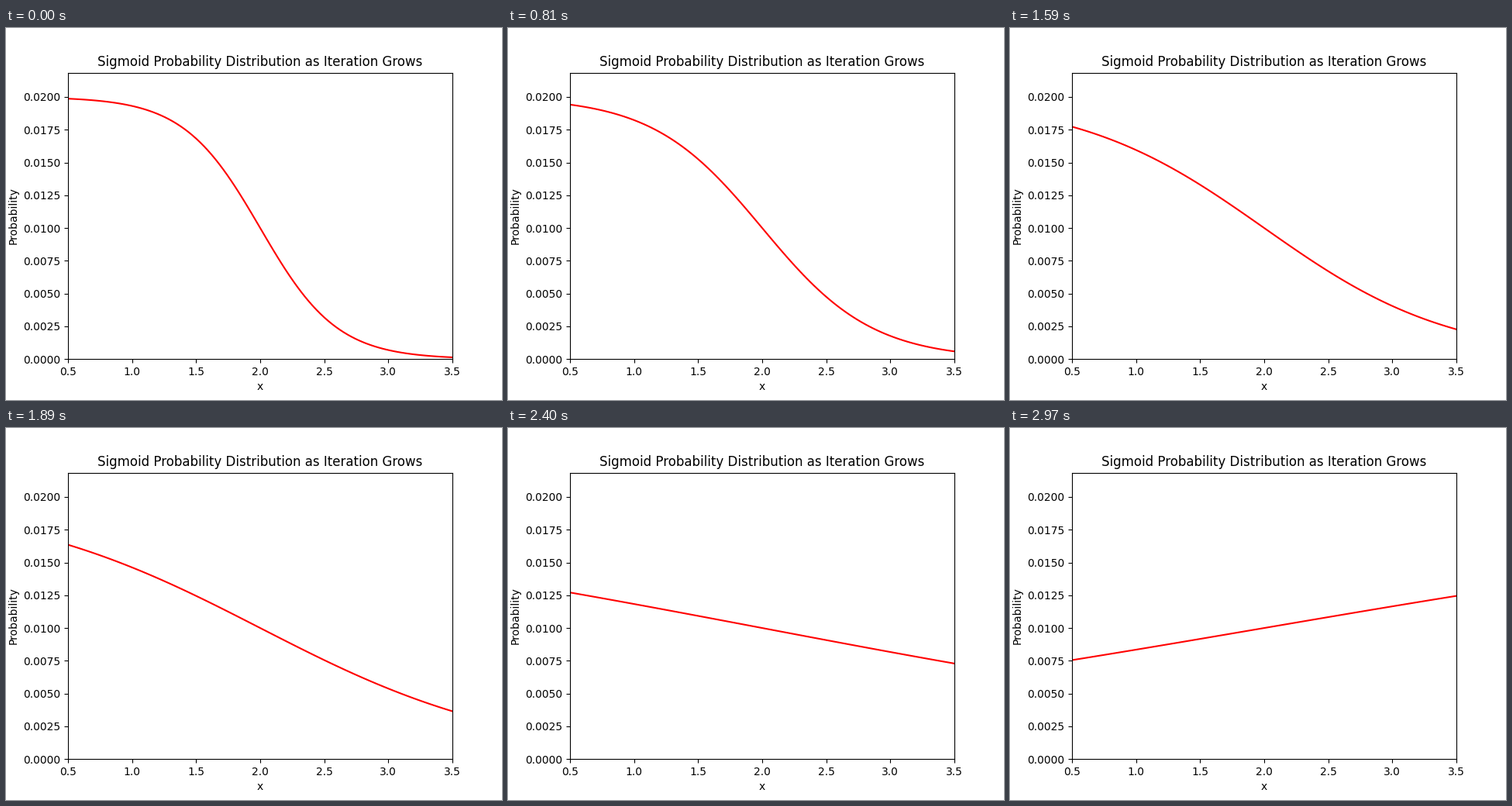
Recreate the animation shown at these times as a matplotlib script. Size 640 by 480 pixels, loop 3 s.

```python
import numpy as np
import matplotlib.pyplot as plt
from matplotlib.animation import FuncAnimation

FRAMES = 100
INTERVAL = 30
POINTS = 100
FLAT_AT = 90  # step at which the curve becomes level

x = np.linspace(0.5, 3.5, POINTS)
u = np.linspace(-5, 5, POINTS)


def probability(step):
    """Falling sigmoid, normalised to sum to one, flattening with each step."""
    steepness = 1 - step / FLAT_AT
    s = 1 / (1 + np.exp(steepness * u))
    return s / s.sum()


fig, ax = plt.subplots(figsize=(6.4, 4.8), dpi=100)
line, = ax.plot(x, probability(0), color="red")
ax.set_xlim(x[0], x[-1])
ax.set_ylim(0, 1.1 * probability(0).max())
ax.set_title("Sigmoid Probability Distribution as Iteration Grows")
ax.set_xlabel("x")
ax.set_ylabel("Probability")


def update(step):
    line.set_ydata(probability(step))
    return line,


anim = FuncAnimation(fig, update, frames=FRAMES, interval=INTERVAL,
                     repeat=True, repeat_delay=0)
plt.show()
```
